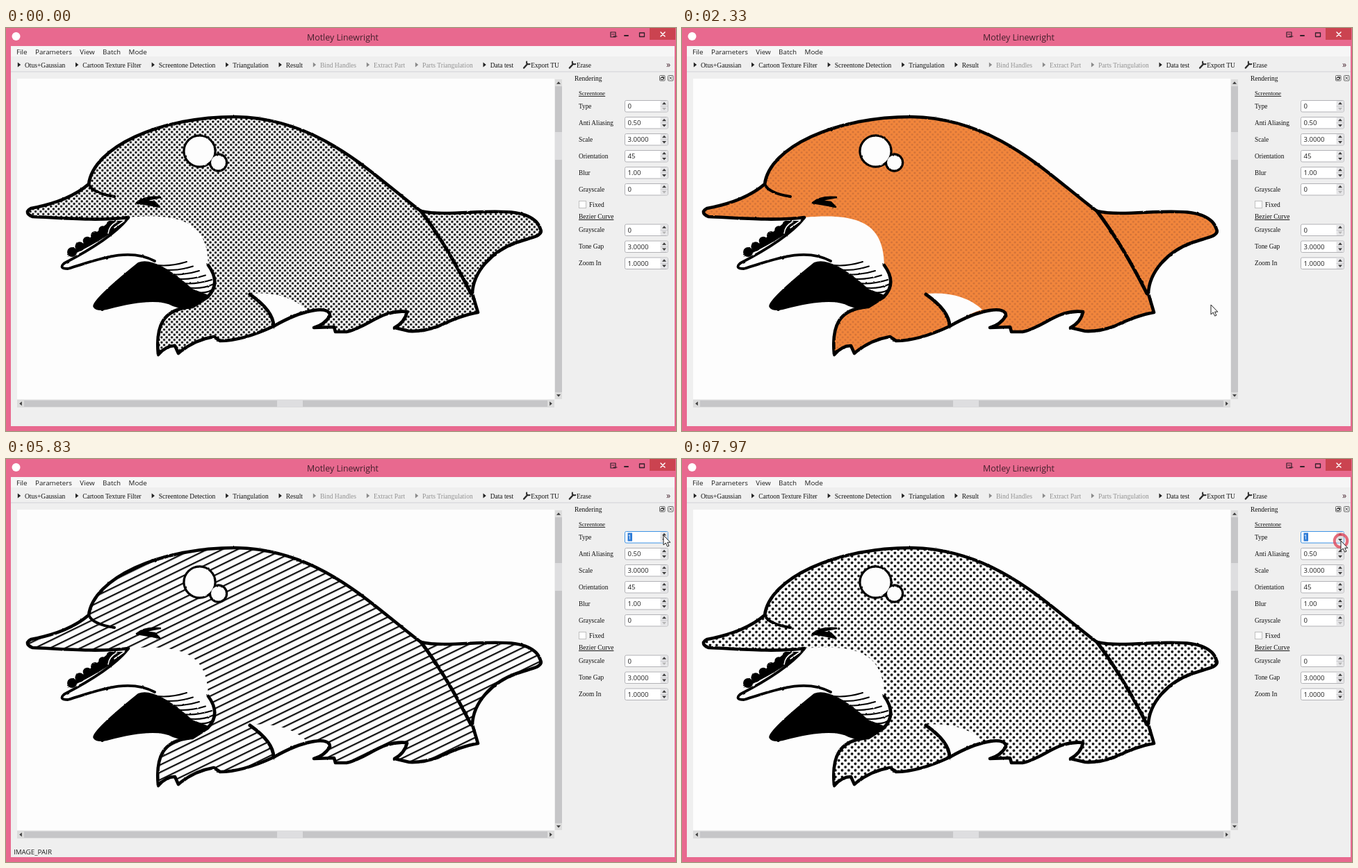
Write an HTML page that moves like this. It is 964x581 px and loops after 8000 ms.

```html
<!DOCTYPE html>
<html lang="en">
<head>
<meta charset="utf-8">
<title>Motley Linewright</title>
<style>
html, body { margin: 0; width: 100%; height: 100%; overflow: hidden; background: #e8698f; }
svg { display: block; }
text { white-space: pre; }
.ui { font: 9.8px "Open Sans", "Noto Sans", sans-serif; fill: #1c1c1c; }
.serif { font: 9.5px "Liberation Serif", serif; fill: #111; }
.label { font-size: 9.3px; }
.value { font-size: 9.6px; }
.title { font-size: 12.4px; fill: #43202c; text-anchor: middle; }
.off { fill: #929292; }
.head { text-decoration: underline; }
</style>
</head>
<body>
<svg id="stage" width="964" height="581" viewBox="0 0 964 581" xmlns="http://www.w3.org/2000/svg">
  <defs id="defs">
    <pattern id="lines" width="20" height="9.6" patternUnits="userSpaceOnUse" patternTransform="rotate(-26)">
      <rect width="20" height="9.6" fill="#fdfdfd"/><rect y="3" width="20" height="2.1"/>
    </pattern>
    <pattern id="cross" width="6.4" height="6.4" patternUnits="userSpaceOnUse" patternTransform="rotate(45)">
      <rect width="7" height="7"/><rect x="1.2" y="1.2" width="3.8" height="3.8" fill="#fdfdfd"/>
    </pattern>
    <filter id="rough" x="0" y="0" width="964" height="581" filterUnits="userSpaceOnUse">
      <feTurbulence type="fractalNoise" baseFrequency=".16" numOctaves="2" seed="4"/>
      <feDisplacementMap in="SourceGraphic" scale="2" xChannelSelector="R" yChannelSelector="G"/>
    </filter>
  </defs>
  <g id="frame"></g>
  <g id="art"></g>
  <g id="panel"></g>
  <text id="status" class="ui" x="11" y="569.5">IMAGE_PAIR</text>
  <circle id="ring" fill="none" stroke="#e0485a" stroke-width="4"/>
  <path id="cursor" d="M0 0V14L3.2 11 5.6 16.2 7.9 15.2 5.6 10.2H9.8Z" fill="#fff" stroke="#222"/>
</svg>
<script>
const NS = 'http://www.w3.org/2000/svg';
const $ = id => document.getElementById(id);
const DARK = '#3c3c3c', PALE = '#b4b4b4', PAPER = '#fdfdfd';
let layer;

function add(tag, attrs, content) {
  const el = document.createElementNS(NS, tag);
  for (const k in attrs) el.setAttribute(k, attrs[k]);
  if (content !== undefined) el.textContent = content;
  return layer.appendChild(el);
}
const rect = (x, y, width, height, fill, more) => add('rect', { x, y, width, height, fill, ...more });
const text = (x, y, str, cls) => add('text', { x, y, class: cls }, str);
const endOf = (x, el) => x + el.getComputedTextLength();
const path = (d, fill, stroke = 'none', width = 1) =>
  add('path', { d, fill, stroke, 'stroke-width': width, 'stroke-linecap': 'round', 'stroke-linejoin': 'round' });
const ink = (d, width) => path(d, 'none', '#000', width);

// Turn: 0 up, 90 right, 180 down, 270 left
const arrow = (x, y, turn, fill = DARK, s = 3) =>
  add('path', { d: `M${-s} ${s * .6}L0 ${-s * .6}L${s} ${s * .6}Z`, transform: `translate(${x} ${y}) rotate(${turn})`, fill });

function dotTone(id, pitch, r, paper, dot) {
  layer = $('defs');
  layer = add('pattern', { id, width: pitch, height: pitch, patternUnits: 'userSpaceOnUse' });
  rect(0, 0, pitch, pitch, paper);
  for (const k of [.25, .75]) add('circle', { cx: pitch * k, cy: pitch * k, r, fill: dot });
}

function scrollBar(length, thumb, size, place) {
  layer = add('g', { transform: place });
  rect(0, 0, length, 10, '#c6c6c8');
  rect(thumb, 0, size, 10, '#dedee0');
  for (const [x, turn] of [[0, 270], [length - 10, 90]]) {
    rect(x, 0, 10, 10, '#dcdcdc');
    arrow(x + 5, 5, turn);
  }
  layer = layer.parentNode;
}

function wrench(x) {
  path(`M${x + 1} 57.5L${x + 6} 52`, 'none', '#2c2c2c', 2.4);
  path(`M${x + 5} 48.5Q${x + 4} 53 ${x + 9.5} 52`, 'none', '#2c2c2c', 2);
}

function drawFrame() {
  layer = $('frame');
  rect(0, 0, 964, 581, '#e8698f');
  rect(7, 26, 955, 548, '#efefef');
  rect(7, 26, 955, 15, '#f6f6f6');
  rect(7, 62.5, 955, 1, '#d2d2d8');
  add('circle', { cx: 14.5, cy: 12, r: 6, fill: '#fff' });
  text(484.5, 17.5, 'Motley Linewright', 'ui title');

  const edge = '#33202a';
  path('M870 6H877V13H870ZM872 9H875M874 12H879', 'none', edge, 1.2);
  path('M890 11H895', 'none', edge, 2);
  path('M911.5 7H918.5V12.5H911.5Z', 'none', edge, 1.3);
  rect(926, 0, 37, 17, '#cb4350');
  path('M942 6L948 12M948 6L942 12', 'none', '#fff', 1.5);

  let x = 15;
  for (const s of ['File', 'Parameters', 'View', 'Batch', 'Mode'])
    x = endOf(x, text(x, 37.5, s, 'ui')) + 11.5;

  x = 16;
  const tools = ['Otus+Gaussian', 'Cartoon Texture Filter', 'Screentone Detection', 'Triangulation', 'Result',
    'Bind Handles', 'Extract Part', 'Parts Triangulation', 'Data test', 'Export TU', 'Erase'];
  for (const s of tools) {
    const off = /Bind|Part/.test(s);
    if (/^E.*(U|se)$/.test(s)) wrench(x);
    else arrow(x + 3, 53, 90, off ? '#8a8a8a' : '#222', 3.6);
    x = endOf(x + 11, text(x + 11, 56.5, s, off ? 'serif off' : 'serif')) + 14;
  }
  text(950, 57, '»', 'ui title').style.textAnchor = 'start';

  rect(16, 73, 773, 462, PAPER);
  scrollBar(461, 76, 40, 'translate(800 74) rotate(90)');
  scrollBar(773, 374, 37, 'translate(16 536.5)');
}

function spinBox(label, y, value) {
  text(824, y + 3, label, 'serif label');
  const box = rect(890.5, y - 8, 62, 16.5, '#fff', { rx: 2, stroke: '#b2b2b6' });
  rect(941.5, y - 7.4, 10.8, 15.4, '#e6e6e8', { rx: 1 });
  rect(941.5, y, 11, .8, '#c4c4c8');
  const mark = rect(894.5, y - 6, 6.5, 12, '#2f7cd6', { opacity: 0 });
  const val = text(894.5, y + 3.6, value, 'ui value');
  const up = arrow(947, y - 4, 0);
  const down = arrow(947, y + 4.2, 180, value === '0' ? PALE : DARK);
  return { box, mark, val, up, down };
}

function drawPanel() {
  layer = $('panel');
  text(818, 76, 'Rendering', 'serif');
  for (const x of [940.5, 952.5]) rect(x, 68.5, 7.5, 7.5, '#f6f6f6', { rx: 1, stroke: '#666' });
  path('M942.5 71.5H945.5V74.5H942.5ZM943.5 70.5H946.5V73M954.5 70.5L958 74M958 70.5L954.5 74', 'none', '#444');
  text(824, 97, 'Screentone', 'serif head').style.fontSize = '8.6px';
  const group = (y, rows) => Object.entries(rows).map(([s, v], i) => spinBox(s, y + 24 * i, v));
  const [type] = group(112.5, { Type: '0', 'Anti Aliasing': '0.50', Scale: '3.0000', Orientation: '45', Blur: '1.00', Grayscale: '0' });
  rect(824.5, 249.5, 10, 10, '#fff', { stroke: '#c0c0c0' });
  text(839, 257.5, 'Fixed', 'serif');
  text(824, 275, 'Bezier Curve', 'serif head');
  group(291, { Grayscale: '0', 'Tone Gap': '3.0000', 'Zoom In': '1.0000' });
  return type;
}

function drawArt() {
  const beak = 'M176 273C130 279 70 273 38 272Q25 266 36 260Q90 250 119 225';
  const back = 'C126 172 220 128 330 128C455 130 530 215 597 264';
  const tail = 'C650 276 755 245 769 290C774 300 755 302 735 309C698 322 672 352 671 383L679 410';
  const sea = 'Q655 414 622 430Q600 438 580 437L559 432Q574 424 577 409C540 405 520 432 490 438L474 438 472 431 443 432Q458 428 466 415C467 400 430 404 385 430';
  const flipper = 'Q340 451 308 451L299 445Q270 450 248 469L243 458Q230 458 219 471C215 430 225 405 268 402L290 388Q310 368 291 342';
  const face = 'C290 282 255 266 176 273Z';
  const outline = beak + back + tail + sea + flipper;

  layer = $('art');
  const tone = path(outline + face, PAPER);
  path('M351 383Q403 379 432 406Q415 410 385 430Q382 410 351 383Z', PAPER);

  layer = add('g', { filter: 'url(#rough)' });
  ink(outline, 4.6);
  ink('M119 225Q124 238 156 243', 4);
  ink('M351 384Q385 408 385 430M597 264Q634 313 669 383', 5);
  path('M188 252Q198 242 222 244Q205 247 198 249L214 251 221 258 206 255Z', '#000', '#000', 2.5);

  // Mouth: a row of beads along the upper gum, then the jaw and its shadow
  ink('M175 275Q150 305 84 339Q75 347 89 347C130 335 175 315 214 336', 3.8);
  path('M88 330L150 278H174Q150 300 100 325Z', '#000');
  for (let i = 0; i < 6; i++) add('circle', { cx: 95 + 11 * i, cy: 323 - 8 * i, r: 7 - i / 3 });
  path('M160 279Q148 285 147 296M170 278L156 288', 'none', '#fff', 1.6);
  path('M126 403Q118 396 190 338Q215 328 268 376L294 386Q266 412 240 401Q215 387 145 406Q130 409 126 403Z', '#000');
  for (let i = 0; i < 7; i++) {
    const x = 218 + 9 * i, y = 342 + 6.5 * i;
    ink(`M${x} ${y}Q${x + 20} ${y + 2} ${Math.min(x + 42, 298)} ${y - 5}`, 2);
  }

  // Shine
  for (const [fill, grow] of [['#000', 1.7], [PAPER, -1.5]])
    for (const [cx, cy, r] of [[278.5, 177.5, 22.5], [305.5, 194, 12]])
      add('circle', { cx, cy, r: r + grow, fill });
  return tone;
}

// Pointer moves: start, end, x, y
const START = [921, 365];
const moves = [[730, 1230, 771, 394], [1280, 1530, 761, 399], [3770, 4570, 937, 100],
  [4600, 4670, 947, 116], [4870, 5030, 946, 110], [6870, 7200, 948, 118]];
const clicks = [1570, 5270, 6230, 7430, 7940];
const tones = [[0, 'scan'], [2230, 'orange'], [3500, 'dots'], [5350, 'lines'], [6310, 'cross'], [7510, 'lines'], [7950, 'dots']];
const types = [[0, 0], [5270, 1], [6270, 2], [7470, 1]];

const stepAt = (steps, t) => steps.filter(s => s[0] <= t).pop()[1];
const ease = p => .4 * p * p * (3 - 2 * p) + .6 * p;
const pointerAt = t => moves.reduce(([x, y], [from, to, mx, my]) => {
  const e = ease(Math.min(1, Math.max(0, (t - from) / (to - from))));
  return [x + (mx - x) * e, y + (my - y) * e];
}, START);

dotTone('scan', 7.4, 1.7, PAPER, '#000');
dotTone('orange', 7.4, 1.5, '#f2863c', '#cf7138');
dotTone('dots', 9.5, 1.85, PAPER, '#000');
drawFrame();
const tone = drawArt();
const spin = drawPanel();

function render(t) {
  tone.setAttribute('fill', `url(#${stepAt(tones, t)})`);
  $('status').style.opacity = t >= 3500 && t < 5950 ? 1 : 0;

  const type = stepAt(types, t), focus = t >= clicks[1];
  spin.val.textContent = type;
  spin.val.style.fill = focus ? '#fff' : '';
  spin.mark.setAttribute('opacity', focus ? 1 : 0);
  spin.box.setAttribute('stroke', focus ? '#3d93e6' : '#b2b2b6');
  spin.up.setAttribute('fill', type === 2 ? PALE : DARK);
  spin.down.setAttribute('fill', type === 0 ? PALE : DARK);

  const place = `translate(${pointerAt(t)})`;
  $('cursor').setAttribute('transform', place);
  $('cursor').style.opacity = t >= moves[0][0] ? 1 : 0;

  const click = clicks.find(at => t >= at && t < at + 270);
  const p = click ? (t - click) / 270 : 1;
  $('ring').setAttribute('transform', place);
  $('ring').setAttribute('r', 6.5 + 24 * p);
  $('ring').style.opacity = .9 * (1 - p);
}

const begin = performance.now();
function tick() {
  render((performance.now() - begin) % 8000);
  requestAnimationFrame(tick);
}
tick();
</script>
</body>
</html>
```
